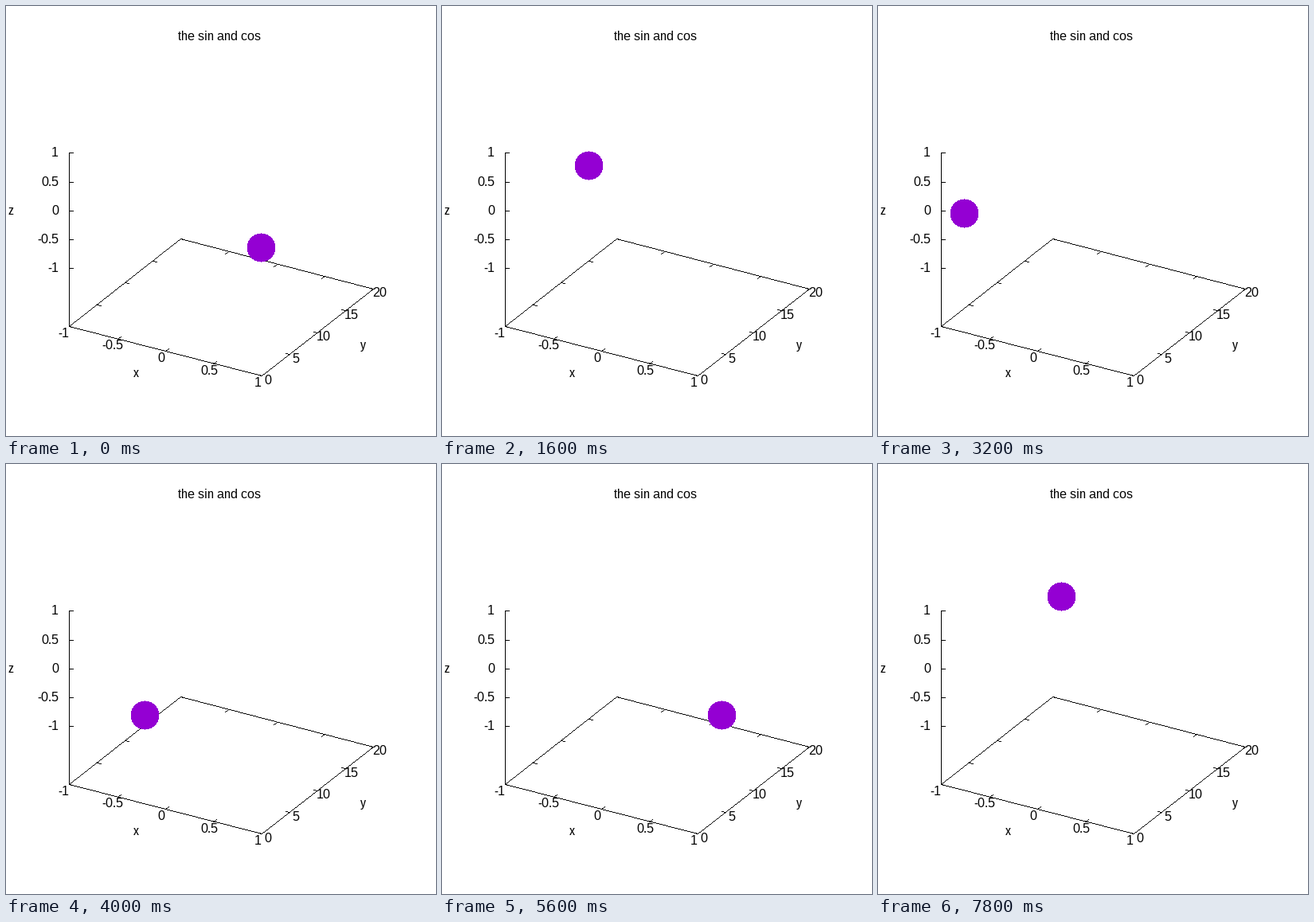
A matplotlib script for the animation above (8000 ms loop, 540x540 px).

```python
import math

import matplotlib.pyplot as plt
import numpy as np
from matplotlib.animation import FuncAnimation

SIZE, DPI = 540, 72          # at 72 dpi one point is one pixel
FRAMES, INTERVAL = 40, 200
STEP = 20 / 99               # 100 samples over 0..20
FLOOR = -2
RADIUS = 18
VIOLET = (148, 0, 211)

plt.rcParams["font.family"] = "Liberation Sans"
plt.rcParams["text.hinting"] = "native"
plt.rcParams["text.hinting_factor"] = 1

fig = plt.figure(figsize=(SIZE / DPI, SIZE / DPI), dpi=DPI, facecolor="white")
ax = fig.add_axes([0, 0, 1, 1])
ax.axis("off")

canvas = np.full((SIZE, SIZE, 3), 255, np.uint8)
rows, cols = np.mgrid[:SIZE, :SIZE]


def project(x, y, z):
    """Map a 3D point to its screen pixel."""
    px = 200.5 + 120.8 * x + 6.985 * y
    py = 288.6 + 31.2 * x - 5.48 * y - 72.5 * z
    return math.floor(px), math.floor(py)


def line(a, b):
    """Draw a hard one-pixel line, ends included."""
    n = max(abs(b[0] - a[0]), abs(b[1] - a[1])) + 1
    xs = np.rint(np.linspace(a[0], b[0], n)).astype(int)
    ys = np.rint(np.linspace(a[1], b[1], n)).astype(int)
    canvas[ys, xs] = 0


def tick(p, dx, dy):
    line(p, (p[0] + dx, p[1] + dy))


def label(x, y, s, ha="center"):
    ax.text(x, y, s, fontsize=16, ha=ha, va="baseline", color="black")


def draw_box():
    corners = [project(x, y, FLOOR)
               for x, y in ((-1, 0), (1, 0), (1, 20), (-1, 20))]
    for a, b in zip(corners, corners[1:] + corners[:1]):
        line(a, b)
    line(corners[0], project(-1, 0, 1))

    for i in range(5):
        v = -1 + i / 2
        tick(project(v, 0, FLOOR), 4, -3)
        tick(project(v, 20, FLOOR), -4, 3)
        label(72.5 + 61 * i, 415.5 + 15.7 * i, f"{v:g}")

        tick(project(-1, 5 * i, FLOOR), 5, 1)
        tick(project(1, 5 * i, FLOOR), -5, -1)
        label(329 + 35 * i, 475 - 27.4 * i, f"{5 * i}")

        p = project(-1, 0, v)
        tick(p, 5, 0)
        label(66, p[1] + 5, f"{v:g}", "right")


def with_ball(cx, cy):
    dx, dy = cols - cx, rows - cy
    disc = (dx**2 + dy**2 <= RADIUS**2) & (abs(dx) < RADIUS)
    picture = canvas.copy()
    picture[disc] = VIOLET
    return picture


draw_box()
image = ax.imshow(canvas, extent=(0, SIZE, SIZE, 0), aspect="auto",
                  interpolation="nearest")
label(268, 43, "the sin and cos")
label(163.5, 466, "x")
label(448.5, 431, "y")
label(6, 262, "z")


def update(i):
    t = STEP * (i + 1) - 0.004
    image.set_data(with_ball(*project(math.cos(t), t, math.sin(t))))
    return (image,)


anim = FuncAnimation(fig, update, frames=FRAMES, interval=INTERVAL,
                     repeat=True, repeat_delay=0)
plt.show()
```
